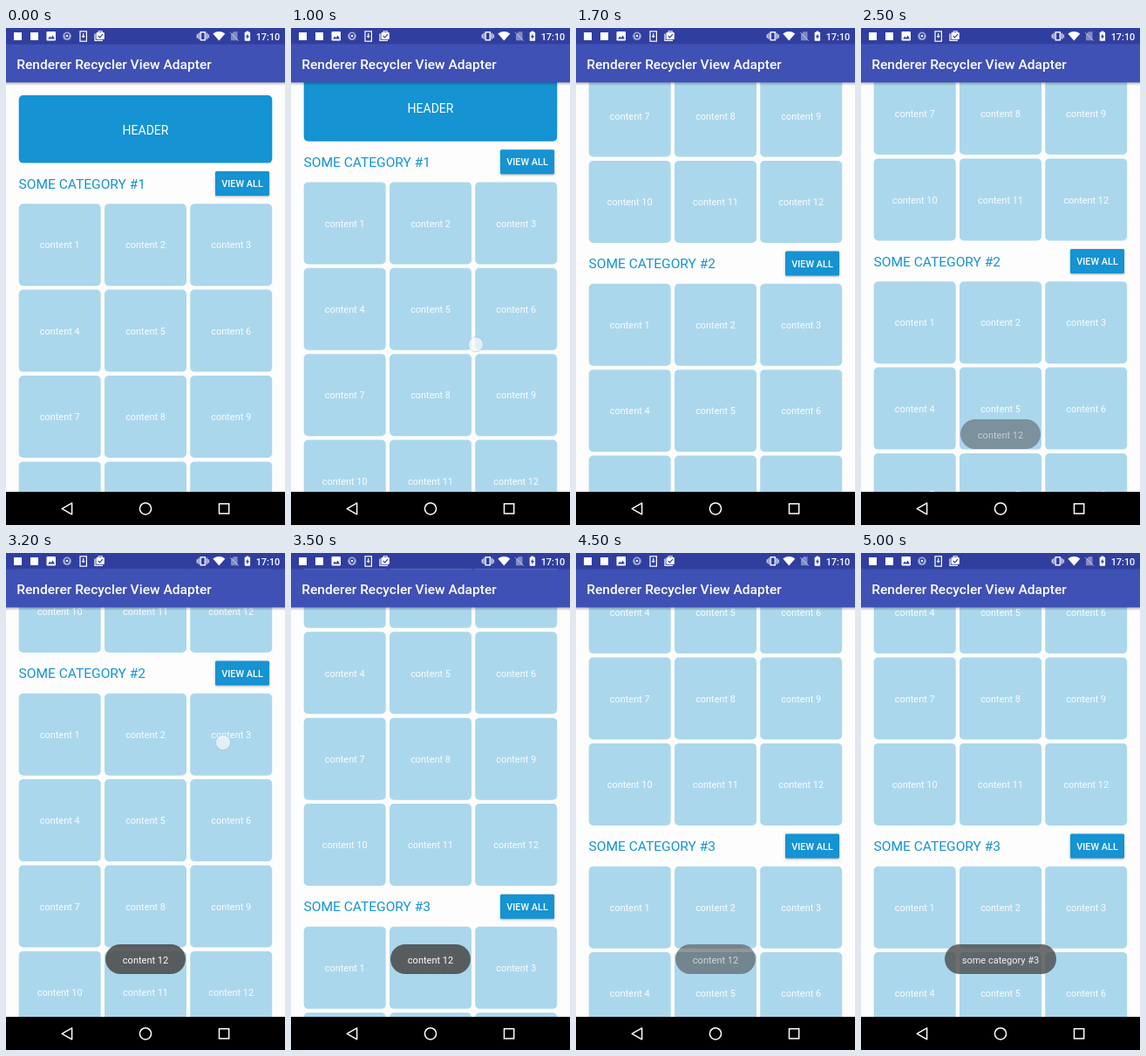
Write an HTML page with a canvas that moves like this. It is 320x569 px and loops after 5.1 s.

```html
<!DOCTYPE html>
<html lang="en">
<head>
<meta charset="utf-8">
<title>Renderer Recycler View Adapter</title>
<style>
html, body { margin: 0; width: 100%; height: 100%; overflow: hidden; background: #000; }
canvas { display: block; width: 320px; height: 569px; }
</style>
</head>
<body>
<canvas id="stage"></canvas>
<script>
const W = 320, H = 569, LOOP = 5100, STEP = 100;
const BLUE = '#1593d2', CELL = '#abd7ec', PAPER = '#fdfdfd';
const COLUMNS = [14.7, 113, 211.2], CELL_SIZE = 94, ROW_PITCH = 98.4, SECTION_PITCH = 436;

const canvas = document.getElementById('stage');
const ctx = canvas.getContext('2d');
const ratio = window.devicePixelRatio || 1;
canvas.width = W * ratio;
canvas.height = H * ratio;
ctx.scale(ratio, ratio);

const clamp = (v) => Math.min(1, Math.max(0, v));
const phase = (t, from, to) => clamp((t - from) / (to - from));
const mix = (a, b, u) => a + (b - a) * u;

function rect(x, y, w, h, color) {
  ctx.fillStyle = color;
  ctx.fillRect(x, y, w, h);
}

function rounded(x, y, w, h, r, color) {
  ctx.fillStyle = color;
  ctx.beginPath();
  ctx.roundRect(x, y, w, h, r);
  ctx.fill();
}

function disc(x, y, r, color) {
  ctx.fillStyle = color;
  ctx.beginPath();
  ctx.arc(x, y, r, 0, Math.PI * 2);
  ctx.fill();
}

function poly(points, color) {
  ctx.fillStyle = color;
  ctx.beginPath();
  points.forEach(([x, y]) => ctx.lineTo(x, y));
  ctx.closePath();
  ctx.fill();
}

function line(points, color, width, close) {
  ctx.strokeStyle = color;
  ctx.lineWidth = width;
  ctx.beginPath();
  points.forEach(([x, y]) => ctx.lineTo(x, y));
  if (close) ctx.closePath();
  ctx.stroke();
}

// Text is centred vertically on the capital letters around y.
function label(str, x, y, size, color, align = 'center', weight = 400) {
  ctx.font = `${weight} ${size}px Roboto, sans-serif`;
  ctx.textAlign = align;
  ctx.textBaseline = 'alphabetic';
  ctx.fillStyle = color;
  ctx.fillText(str, x, y + size * 0.356);
}

// Each swipe is a finger drag followed by a decelerating fling.
const SWIPES = [
  { down: 900, up: 1300, rest: 1900, from: 0, release: 228, to: 347, decay: 3.5, x: [214, 206], y: 159 },
  { down: 2800, up: 3200, rest: 4000, from: 347, release: 476.5, to: 714.5, decay: 2.63, x: [254, 249], y: 217 }
];
const TAPS = [
  { from: 2200, to: 2400, x: 262, y: 200 },
  { from: 4200, to: 4400, x: 272, y: 338 }
];
const TOASTS = [
  { text: 'content 12', width: 92, enter: [2300, 2650], exit: [4400, 4700] },
  { text: 'some category #3', width: 128, enter: [4700, 5030], exit: [6000, 6300] }
];

function scrollAt(t) {
  let s = 0;
  for (const w of SWIPES) {
    if (t < w.down) break;
    s = t <= w.up
      ? mix(w.from, w.release, phase(t, w.down, w.up) ** 1.6)
      : mix(w.to, w.release, (1 - phase(t, w.up, w.rest)) ** w.decay);
  }
  return s;
}

function drawSection(n, top) {
  label('SOME CATEGORY #' + n, 14.5, top + 14.3, 15.56, BLUE, 'left');

  ctx.save();
  ctx.shadowColor = 'rgba(0,0,0,.32)';
  ctx.shadowBlur = 2.5 * ratio;
  ctx.shadowOffsetY = 1 * ratio;
  rounded(240, top, 62, 28, 1.5, BLUE);
  ctx.restore();
  label('VIEW ALL', 271, top + 14.3, 10.9, '#fff', 'center', 500);

  for (let i = 0; i < 12; i++) {
    const x = COLUMNS[i % 3];
    const y = top + 37.2 + Math.floor(i / 3) * ROW_PITCH;
    if (y > 531 || y + CELL_SIZE < 62) continue;
    rounded(x, y, CELL_SIZE, CELL_SIZE, 5, CELL);
    label('content ' + (i + 1), x + CELL_SIZE / 2, y + 47.4, 10.9, 'rgba(255,255,255,.95)');
  }
}

function drawList(s) {
  rect(0, 62, W, 469, PAPER);
  rounded(14.7, 77 - s, 290.6, 77.6, 5, BLUE);
  label('HEADER', 160, 116.7 - s, 14, '#fff');
  for (let n = 1; n <= 3; n++) {
    const top = 164 + SECTION_PITCH * (n - 1) - s;
    if (top < 531 && top + SECTION_PITCH > 62) drawSection(n, top);
  }
}

function drawTouch(x, y) {
  disc(x, y, 8.5, 'rgba(245,248,252,.72)');
  ctx.strokeStyle = 'rgba(130,160,180,.45)';
  ctx.lineWidth = 0.8;
  ctx.stroke();
}

function drawTouches(t, s) {
  for (const w of SWIPES) {
    if (t < w.down || t > w.up) continue;
    drawTouch(mix(...w.x, phase(t, w.down, w.up)), w.y + w.release - s);
  }
  for (const p of TAPS) if (t >= p.from && t < p.to) drawTouch(p.x, p.y);
}

function drawToasts(t) {
  for (const o of TOASTS) {
    const alpha = phase(t, ...o.enter) * (1 - phase(t, ...o.exit));
    if (!alpha) continue;
    ctx.save();
    ctx.globalAlpha = alpha;
    rounded(160 - o.width / 2, 448, o.width, 34, 17, 'rgba(76,76,76,.88)');
    label(o.text, 160, 465.7, 11, '#fff');
    ctx.restore();
  }
}

function drawStatusIcons() {
  const dim = 'rgba(255,255,255,.4)', bar = '#303f9f';

  // notifications
  rect(9, 5, 9, 9, '#fff');
  rect(28, 5, 9, 9, '#fff');
  rounded(46.5, 4, 10.5, 10.5, 1.2, '#fff');
  poly([[48, 12.5], [50.3, 9.5], [51.7, 11.2], [53.5, 8.5], [56, 12.5]], bar);
  disc(70, 9.3, 4.8, 'rgba(255,255,255,.55)');
  poly([[67.5, 7], [70, 6], [72.5, 7], [72, 10.5], [70, 12.5], [68, 10.5]], bar);
  disc(70, 9, 1.2, '#fff');
  ctx.strokeStyle = '#fff';
  ctx.lineWidth = 1.2;
  ctx.strokeRect(85, 3.8, 7.4, 11.4);
  rect(88.1, 6, 1.2, 3.5, '#fff');
  poly([[86.5, 9], [90.9, 9], [88.7, 11.5]], '#fff');
  line([[102, 6.5], [102, 14.4], [111, 14.4]], '#fff', 1.2);
  rounded(103.5, 5, 9.3, 8, 1, '#fff');
  line([[106.2, 5], [106.2, 3.7], [110.2, 3.7], [110.2, 5]], '#fff', 1.1);
  line([[105.8, 9], [107.6, 10.8], [111, 7.2]], bar, 1.2);

  // system
  ctx.strokeStyle = '#fff';
  ctx.lineWidth = 1.4;
  ctx.strokeRect(223.2, 4.8, 5.2, 9);
  for (const d of [-1, 1]) {
    line([[225.8 + d * 4.6, 5.8], [225.8 + d * 4.6, 12.8]], '#fff', 1.1);
    line([[225.8 + d * 6.5, 7.2], [225.8 + d * 6.5, 11.4]], '#fff', 1.1);
  }
  ctx.fillStyle = '#fff';
  ctx.beginPath();
  ctx.moveTo(244.3, 14.6);
  ctx.lineTo(237.3, 6.4);
  ctx.quadraticCurveTo(244.3, 1.8, 251.3, 6.4);
  ctx.fill();
  poly([[258, 7.5], [261, 4.3], [265.5, 4.3], [265.5, 14.3], [258, 14.3]], dim);
  line([[256.8, 4.8], [267, 14.8]], 'rgba(255,255,255,.5)', 1);
  rounded(273.7, 4.8, 6.4, 10, 0.8, '#fff');
  rect(275.5, 3.6, 2.8, 1.5, '#fff');
  poly([[277.4, 6.3], [274.9, 10.4], [276.5, 10.4], [276.5, 13.2], [279, 9.1], [277.4, 9.1]], bar);
  label('17:10', 314.3, 9.8, 10.9, '#fff', 'right', 500);
}

function drawBars() {
  const shade = ctx.createLinearGradient(0, 62, 0, 66);
  shade.addColorStop(0, 'rgba(0,0,0,.28)');
  shade.addColorStop(1, 'rgba(0,0,0,0)');
  rect(0, 62, W, 4, shade);
  rect(0, 0, W, 18.5, '#303f9f');
  rect(0, 18.5, W, 43.8, '#3f51b5');
  label('Renderer Recycler View Adapter', 12.3, 41, 15.56, '#fff', 'left', 500);
  drawStatusIcons();

  rect(0, 531, W, 38, '#000');
  ctx.lineJoin = 'round';
  line([[64.2, 550.3], [75.6, 543.8], [75.6, 556.8]], '#fff', 1.5, true);
  ctx.lineJoin = 'miter';
  ctx.lineWidth = 1.5;
  ctx.strokeStyle = '#fff';
  ctx.beginPath();
  ctx.arc(160, 550.3, 6.6, 0, Math.PI * 2);
  ctx.stroke();
  ctx.strokeRect(244.5, 544.7, 11.2, 11.2);
}

function draw(now) {
  // the screen refreshes ten times a second
  const t = Math.floor((now % LOOP) / STEP) * STEP;
  const s = scrollAt(t);
  drawList(s);
  drawBars();
  drawToasts(t);
  drawTouches(t, s);
}

const start = performance.now();
function tick() {
  draw(performance.now() - start);
  requestAnimationFrame(tick);
}
tick();
</script>
</body>
</html>
```
